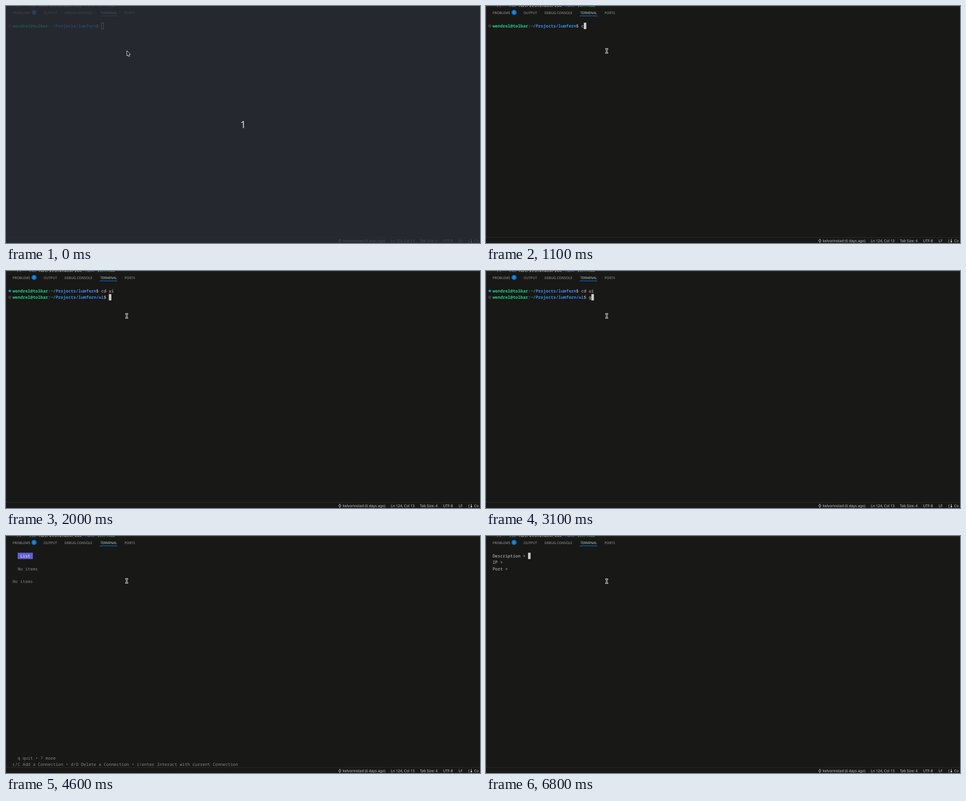
An HTML page with a canvas that plays this animation: 1057 px wide and 530 px high, repeating every 8 s.

```html
<!DOCTYPE html>
<html lang="en">
<head>
<meta charset="utf-8">
<title>Terminal session</title>
<style>
  html, body { margin: 0; width: 100%; height: 100%; overflow: hidden; background: #181816; }
  canvas { display: block; }
</style>
</head>
<body>
<canvas id="stage" width="1057" height="530"></canvas>
<script>
const ctx = document.getElementById('stage').getContext('2d');
const LOOP = 8000;
const CELL = 5.648, ROW = 14.12, LEFT = 14.7, TOP = 37.4;
const MONO = '"Noto Sans Mono", monospace';
const SANS = '"Noto Sans", sans-serif';
const BG = '#181816', FG = '#cccccc', GREEN = '#23d18b', BLUE = '#3b8eea', ACCENT = '#0078d4', DIM = '#8a8a87';

// Time at which each character of a command appears.
const cdKeys = { text: 'cd ui', at: [1100, 1200, 1300, 1400, 1600] };
const runKeys = { text: 'go run .', at: [3100, 3200, 3400, 3600, 3700, 3800, 3900, 4100] };
const typed = (keys, t) => keys.text.slice(0, keys.at.filter(k => k <= t).length);

const colX = col => LEFT + col * CELL;
const rowY = row => TOP + row * ROW;

function box(x, y, w, h, color) {
  ctx.fillStyle = color;
  ctx.fillRect(x, y, w, h);
}

function label(text, x, y, size, color, font = SANS) {
  ctx.font = `${size}px ${font}`;
  ctx.fillStyle = color;
  ctx.fillText(text, x, y);
}

function disc(x, y, r, color) {
  ctx.fillStyle = color;
  ctx.beginPath();
  ctx.arc(x, y, r, 0, 7);
  ctx.fill();
}

function ring(x, y, r, color) {
  ctx.strokeStyle = color;
  ctx.lineWidth = 1;
  ctx.beginPath();
  ctx.arc(x, y, r, 0, 7);
  ctx.stroke();
}

// Writes text on the character grid and returns the next free column.
function print(text, col, row, color = FG, weight = 400, y = rowY(row) + 10.9) {
  ctx.font = `${weight} 9.413px ${MONO}`;
  ctx.fillStyle = color;
  for (const ch of text) ctx.fillText(ch, colX(col++), y);
  return col;
}

function cursor(col, row, hollow) {
  const x = colX(col), y = rowY(row);
  if (hollow) {
    ctx.strokeStyle = FG;
    ctx.lineWidth = 1;
    ctx.strokeRect(Math.floor(x) + .5, Math.floor(y) + .5, 5, 14);
  } else box(x, y, CELL, 14.2, FG);
}

function prompt(row, path, command, done) {
  const y = rowY(row) + 7.2;
  done ? disc(8.5, y, 3, '#1b81a8') : ring(8.5, y, 2.4, '#6c6c6a');
  let col = print('wendrel@tolbar', 0, row, GREEN, 700);
  col = print(':', col, row);
  col = print('~/Projects/' + path, col, row, BLUE, 700);
  return print('$ ' + command, col, row);
}

function shell(t) {
  const entered = t >= 2000;
  const end = prompt(0, 'lumfern', typed(cdKeys, t), entered);
  if (t < 1900) return cursor(end, 0, t < 500);
  if (!entered) return cursor(0, 1);
  const end2 = prompt(1, 'lumfern/ui', typed(runKeys, t), false);
  t < 4300 ? cursor(end2, 1) : cursor(0, 2);
}

function list() {
  box(colX(2), rowY(0), 6 * CELL, ROW, '#5f5fd7');
  print('List', 3, 0, '#ffffd7');
  print('No items', 2, 2, DIM);
  print('.', print('No items', 0, 4, '#80807d'), 4, '#666663');
  print('q quit • ? more', 2, 32, DIM);
  print('c/C Add a Connection • d/D Delete a Connection • i/enter Interact with current Connection', 0, 33, DIM);
}

function form() {
  ['Description > ', 'IP > ', 'Port > '].forEach((text, row) => print(text, 0, row));
  cursor(14, 0);
}

function editorSliver() {
  ctx.save();
  ctx.beginPath();
  ctx.rect(0, 0, 1057, 2);
  ctx.clip();
  const col = (51 - LEFT) / CELL;
  const word = (text, offset, color) => print(text, col + offset, 0, color, 400, 1.6);
  word('11', -5, '#6e7681');
  word('var', 0, '#569cd6');
  word('MutFreshIndexProc', 4, '#d4d4d4');
  word('func', 22, '#569cd6');
  word('icn.Map', 27, '#4ec9b0');
  ctx.restore();
}

function chrome() {
  box(0, 0, 1057, 530, BG);
  box(0, 1, 1057, 1, '#2b2b2a');
  box(0, 2, 1, 515, '#2b2b2a');
  editorSliver();

  const tabs = [['PROBLEMS', 14.7], ['OUTPUT', 84], ['DEBUG CONSOLE', 130.4], ['TERMINAL', 210.4], ['PORTS', 264.2]];
  for (const [name, x] of tabs) label(name, x, 17.6, 7.55, name === 'TERMINAL' ? FG : '#9d9d9b');
  disc(62.6, 14.4, 5.6, ACCENT);
  label('1', 60.8, 16.7, 6.2, '#ffffff');
  box(209, 21.5, 39, 1.3, ACCENT);

  box(0, 517, 1057, 1, '#2b2b2a');
  ring(744.5, 525, 2.3, FG);
  box(744, 520.5, 1, 2.2, FG);
  box(744, 527.3, 1, 2.2, FG);
  const status = [['kelvorinstad (6 days ago)', 751], ['Ln 124, Col 13', 858], ['Tab Size: 4', 923],
    ['UTF-8', 974.6], ['LF', 1009.6], ['{', 1030.5], ['Co', 1044]];
  for (const [text, x] of status) label(text, x, 528, 8.15, FG);
  box(1037, 521, 1, 5, FG);
  disc(1037.7, 527, 1.7, FG);
}

function polygon(points, x, y, fill, stroke) {
  ctx.beginPath();
  points.forEach(([px, py]) => ctx.lineTo(x + px, y + py));
  ctx.closePath();
  ctx.fillStyle = fill;
  ctx.fill();
  ctx.strokeStyle = stroke;
  ctx.lineWidth = 1;
  ctx.stroke();
}

function arrow(x, y) {
  polygon([[0, 0], [0, 11.5], [2.6, 9.2], [4.4, 13], [6.4, 12], [4.7, 8.4], [8, 8]], x, y, '#111111', '#f2f2f2');
}

// Dark I-beam with a light outline.
function beam(x, y) {
  const bars = [[-2.2, -4.9, 4.4, .9], [-.5, -4.9, 1, 9.8], [-2.2, 4, 4.4, .9]];
  for (const [bx, by, w, h] of bars) box(x + bx - .9, y + by - .9, w + 1.8, h + 1.8, '#f2f2f2');
  for (const [bx, by, w, h] of bars) box(x + bx, y + by, w, h, '#111111');
}

function draw(t) {
  ctx.textRendering = 'geometricPrecision';
  chrome();
  if (t < 4600) shell(t);
  else if (t < 6700) list();
  else form();

  if (t < 100) {
    box(0, 0, 1057, 530, 'rgba(41, 45, 54, .77)');
    label('1', 522.4, 272.5, 22, '#dededc');
    arrow(269.5, 100);
  } else beam(269.2, t < 6800 ? 100.4 : 101.2);
}

let start;
function tick(now) {
  start ??= now;
  draw((now - start) % LOOP);
  requestAnimationFrame(tick);
}
requestAnimationFrame(tick);
</script>
</body>
</html>
```
